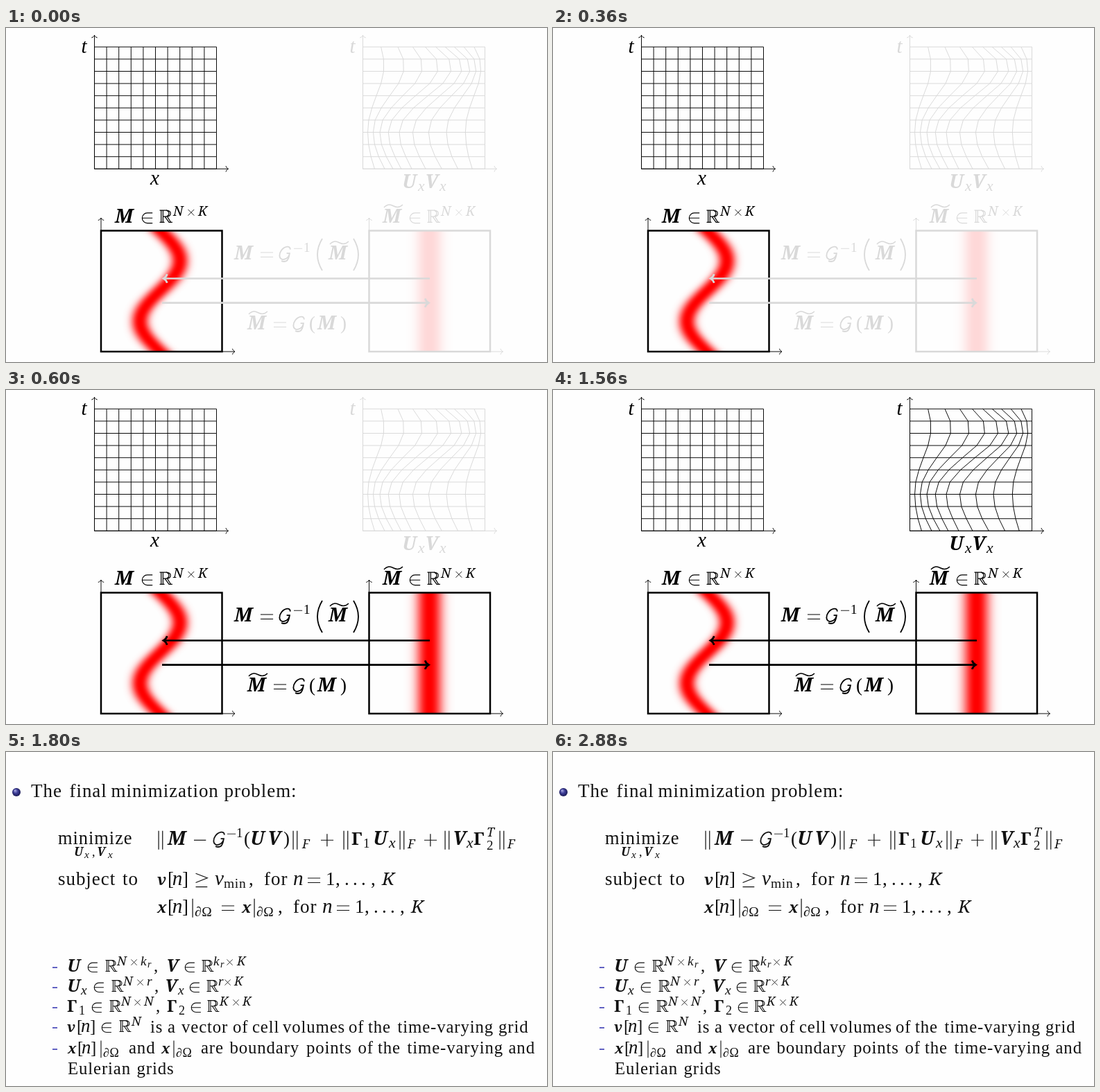
These frames come from a looping animation (780 by 482 pixels, 3600 ms). An HTML page with a canvas:

```html
<!DOCTYPE html>
<html lang="en">
<head>
<meta charset="utf-8">
<title>Grid mapping</title>
<style>
html, body { margin: 0; width: 100%; height: 100%; overflow: hidden; background: #fefefe; }
canvas { display: block; }
</style>
</head>
<body>
<canvas id="stage" width="780" height="482"></canvas>
<script>
const ctx = document.getElementById('stage').getContext('2d');
const BG = '#fefefe', INK = '#000', FADED = '#d9d9d9';
const SERIF = '"Liberation Serif", serif', WIDE = '"Noto Serif", serif';
const LOOP = 3600, CUTS = [600, 1200, 1800];

// Stroked math symbols, 100 units per em, baseline at 0
const SYMBOLS = {
  '∈': 'M60-52H32A27 27 0 0 0 32 2H60M5-25H60',
  '=': 'M0-37H67M0-13H67',
  '+': 'M0-25H67M33-58V8',
  '−': 'M0-25H64',
  '×': 'M8-48L54-2M54-48L8-2',
  '≥': 'M2-62L64-38L2-13M2 10H64',
  '‖': 'M4-75V25M25-75V25',
  '|': 'M4-75V25',
  'ℝ': 'M2-66H38C68-66 68-33 36-33H20M10-66V-2M20-66V-2M2-2H28M30-33L52-2H70M42-34L62-2M38-66C56-60 56-40 38-33',
  '𝒢': 'M62-53C63-65 54-69 45-68C20-64 4-38 5-20C6-3 20 3 32-1C47-6 57-19 59-33H43M59-33C56-14 50 4 42 8C33 12 22 11 15 8'
};

function setInk(c) { ctx.fillStyle = ctx.strokeStyle = c; }

function stroke(d, width, x = 0, y = 0, scale = 1, angle = 0) {
  ctx.save();
  ctx.translate(x, y);
  ctx.rotate(angle);
  ctx.scale(scale, scale);
  ctx.lineWidth = width / scale;
  ctx.stroke(new Path2D(d));
  ctx.restore();
}

function glyphs(font, y, size, pairs, spacing = 0) {
  ctx.font = font(size);
  ctx.letterSpacing = spacing + 'px';
  for (let i = 0; i < pairs.length; i += 2) ctx.fillText(pairs[i], pairs[i + 1], y);
}

const roman = (y, size, ...p) => glyphs(s => `${s}px ${SERIF}`, y, size, p, size * 0.035);
const italic = (y, size, ...p) => glyphs(s => `italic ${s * 1.08}px ${SERIF}`, y, size, p);
const caps = (y, size, ...p) => glyphs(s => `italic ${s}px ${WIDE}`, y, size, p);
const bold = (y, size, ...p) => glyphs(s => `italic bold ${s * 1.02}px ${WIDE}`, y, size, p);
const vec = (y, size, ...p) => glyphs(s => `italic bold ${s * 0.83}px ${WIDE}`, y, size, p);
const gamma = (y, size, ...xs) => glyphs(s => `bold ${s * 0.95}px ${WIDE}`, y, size, xs.flatMap(x => ['Γ', x]));

function sym(y, size, ...p) {
  for (let i = 0; i < p.length; i += 2) {
    const w = p[i] === '𝒢' ? 0.068 : 0.045;
    stroke(SYMBOLS[p[i]], size * w, p[i + 1], y, size / 100);
  }
}

function tilde(x, y) {
  stroke('M0 2C6-4 10-2 14 0S22 3 27-2', 1.5, x, y);
}

function arrow(x1, y1, x2, y2, width, tip) {
  stroke(`M${x1} ${y1}L${x2} ${y2}`, width);
  stroke('M-5-6C-4-2-1-.6 0 0C-1 .6-4 2-5 6', width, x2, y2, tip, Math.atan2(y2 - y1, x2 - x1));
}

function warpedX(i, row) {
  const shift = [0.44, 0.93, 1, 0.7, 0.15, -0.38, -0.77, -0.9, -0.83, -0.62, -0.34][row];
  const a = Math.PI * i / 10;
  return 17.6 * i + 39 * shift * Math.sin(a)
    + 5.5 * Math.exp(-1.1 * row) * Math.sin(2 * a)
    + 4.25 * Math.exp(-0.8 * (10 - row)) * Math.sin(3 * a);
}

function mesh(x0, xAt) {
  let d = '';
  for (let i = 0; i <= 10; i++) {
    const y = 27.3 + 17.6 * i;
    d += `M${x0} ${y}h176`;
    for (let row = 0; row <= 10; row++) {
      d += `${row ? 'L' : 'M'}${x0 + xAt(i, row)} ${27.3 + 17.6 * row}`;
    }
  }
  stroke(d, 0.95);
  arrow(x0, 203.3, x0 + 193, 203.3, 0.95, 0.7);
  arrow(x0, 203.3, x0, 10.5, 0.95, 0.7);
  italic(36, 27, 't', x0 - 19);
}

// Soft red band: center and half width depend on the row
function band(at, power, alpha) {
  ctx.fillStyle = '#f00';
  for (let y = 292; y < 467; y++) {
    const [c, w] = at((y + 0.5 - 292) / 175);
    for (let x = Math.floor(c - 45); x < c + 45; x++) {
      const v = Math.exp(-Math.pow(Math.abs(x + 0.5 - c) / w, power));
      if (v < 0.004) continue;
      ctx.globalAlpha = v * alpha;
      ctx.fillRect(x, y, 1, 1);
    }
  }
  ctx.globalAlpha = 1;
}

function wave(s) {
  const a = 2 * Math.PI * s, slope = 1.02 * Math.cos(a);
  return [222 + 28.5 * Math.sin(a), 13 * Math.pow(1 + slope * slope, 0.3)];
}

function frameBox(x) {
  stroke(`M${x} 292.5h174.5v174.5h-174.5z`, 2.5);
  arrow(x, 467, x + 193, 467, 0.95, 0.7);
  arrow(x, 467, x, 274, 0.95, 0.7);
}

function spaceLabel(x, y) {
  bold(y, 27, 'M', x + 2);
  sym(y, 27, '∈', x + 40, 'ℝ', x + 66);
  caps(y - 10, 19, 'N', x + 86, 'K', x + 122);
  sym(y - 10, 19, '×', x + 106);
}

function diagram(lowerOn, upperOn) {
  setInk(INK);
  mesh(127.5, i => 17.6 * i);
  italic(226, 27, 'x', 208);

  setInk(upperOn ? INK : FADED);
  mesh(514.5, warpedX);
  bold(231, 27, 'U', 571, 'V', 604);
  italic(235, 20, 'x', 594, 'x', 625);

  band(wave, 2.4, 1);
  band(() => [610.5, 18.5], 2.4, lowerOn ? 1 : 0.15);
  setInk(INK);
  frameBox(137);
  spaceLabel(155, 281);

  setInk(lowerOn ? INK : FADED);
  frameBox(523.5);
  spaceLabel(541, 281);
  tilde(545, 257);
  arrow(611, 361.5, 227, 361.5, 2.7, 1.05);
  arrow(225, 396.7, 609.5, 396.7, 2.7, 1.05);

  bold(334, 27, 'M', 329, 'M', 465);
  sym(334, 27, '=', 367, '𝒢', 393);
  sym(323, 19, '−', 415);
  roman(323, 19, '1', 429);
  stroke('M456 304Q442 327 456 350M501 304Q515 327 501 350', 1.8);
  tilde(467, 310);

  bold(435, 27, 'M', 348, 'M', 449);
  sym(435, 27, '=', 386, '𝒢', 413);
  roman(435, 27, '(', 437, ')', 482);
  tilde(350, 411);
}

function counter(x, y) {
  roman(y, 27, 'for', x, '1', x + 89, ',', x + 103, ',', x + 154);
  for (let i = 0; i < 3; i++) roman(y, 27, '.', x + 116 + 12 * i);
  italic(y, 27, 'n', x + 42);
  sym(y, 27, '=', x + 63);
  caps(y, 26, 'K', x + 170);
}

function indexed(x, y, size, name) {
  vec(y, size, name, x);
  roman(y, size, '[', x + 0.56 * size, ']', x + 1.33 * size);
  italic(y, size, 'n', x + 0.81 * size);
}

function boundary(x, y, size) {
  sym(y, size, '|', x);
  roman(y + 5, size * 0.72, '∂Ω', x + 4);
}

function power(y, x, base, a, times, b) {
  sym(y, 24.8, '∈', x, 'ℝ', base);
  sym(y - 9, 18, '×', times);
  for (const [ch, at] of [a, b]) {
    (ch < 'a' ? caps : italic)(y - 9, 18, ch, at);
    if (ch === 'k') italic(y - 6, 13, 'r', at + 10);
  }
}

function problem() {
  const ball = ctx.createRadialGradient(13, 55.5, 0.5, 15, 58, 6.5);
  ball.addColorStop(0, '#a0a0dc');
  ball.addColorStop(0.45, '#3c3c96');
  ball.addColorStop(1, '#16164c');
  ctx.fillStyle = ball;
  ctx.beginPath();
  ctx.arc(15, 58, 6, 0, 7);
  ctx.fill();

  setInk('#111');
  roman(65, 27, 'The', 36, 'final', 91.5, 'minimization', 151.5, 'problem:', 314.5);
  roman(133, 26.5, 'minimize', 75);
  bold(150, 17, 'U', 98, 'V', 131);
  italic(153, 14, 'x', 113, 'x', 147);
  roman(150, 18, ',', 124);

  const y = 134;
  bold(y, 27, 'M', 233, 'U', 352, 'V', 377, 'U', 529, 'V', 644);
  sym(y, 27, '‖', 219, '−', 271, '𝒢', 298, '‖', 413, '+', 454, '‖', 486,
    '‖', 567, '+', 603, '‖', 632, '‖', 711);
  roman(y, 27, '(', 343, ')', 400);
  sym(123, 19, '−', 319);
  roman(123, 19, '1', 332);
  caps(139, 18, 'F', 427, 'F', 579, 'F', 723);
  gamma(y, 27, 498, 674);
  roman(138, 19, '1', 515);
  roman(141, 19, '2', 693);
  caps(122, 18, 'T', 693);
  italic(138, 20, 'x', 552, 'x', 664);

  roman(192, 27, 'subject', 75, 'to', 168);
  indexed(218, 192, 27, 'v');
  sym(192, 27, '≥', 273);
  italic(192, 27, 'v', 301);
  roman(196, 19.5, 'min', 314);
  roman(192, 27, ',', 350);
  counter(372, 192);

  indexed(218, 232, 27, 'x');
  boundary(268, 232, 27);
  sym(232, 27, '=', 311);
  vec(232, 27, 'x', 340);
  boundary(357, 232, 27);
  roman(232, 27, ',', 392);
  counter(414, 232);

  setInk('#4646b8');
  for (const b of [317, 346, 375, 404, 435]) stroke(`M67 ${b - 6}h7`, 1.7);

  setInk('#111');
  const size = 24.8;
  bold(317, size, 'U', 88, 'V', 231);
  power(317, 117, 143, ['N', 160], 179, ['k', 194]);
  roman(317, size, ',', 213);
  power(317, 257, 282, ['k', 299], 317, ['K', 333]);

  bold(346, size, 'U', 88, 'V', 229);
  italic(350, 18, 'x', 108, 'x', 248);
  power(346, 126, 152, ['N', 169], 188, ['r', 203]);
  roman(346, size, ',', 214);
  power(346, 264, 289, ['r', 306], 314, ['K', 329]);

  gamma(375, size, 88, 232);
  roman(379, 18, '1', 105, '2', 249);
  power(375, 123, 149, ['N', 166], 184, ['N', 199]);
  roman(375, size, ',', 216);
  power(375, 266, 290, ['K', 308], 326, ['K', 341]);

  indexed(88, 404, size, 'v');
  sym(404, size, '∈', 137, 'ℝ', 163);
  caps(395, 18, 'N', 181);
  roman(405, size, 'is', 208, 'a', 233, 'vector', 253, 'of', 327, 'cell', 355,
    'volumes', 399, 'of', 494, 'the', 522, 'time-varying', 564.5, 'grid', 710);

  indexed(89, 435, size, 'x');
  boundary(136, 435, size);
  roman(435, size, 'and', 177);
  vec(435, size, 'x', 224);
  boundary(241, 435, size);
  roman(435, size, 'are', 281, 'boundary', 322.5, 'points', 433, 'of', 507.5,
    'the', 536, 'time-varying', 578.5, 'and', 724.5);
  roman(465, size, 'Eulerian', 89, 'grids', 188.5);
}

let shown = -1;
const start = performance.now();

function tick() {
  const t = (performance.now() - start) % LOOP;
  const step = CUTS.filter(c => t >= c).length;
  if (step !== shown) {
    shown = step;
    ctx.fillStyle = BG;
    ctx.fillRect(0, 0, 780, 482);
    if (step === 3) problem();
    else diagram(step > 0, step > 1);
  }
  requestAnimationFrame(tick);
}
tick();
</script>
</body>
</html>
```
